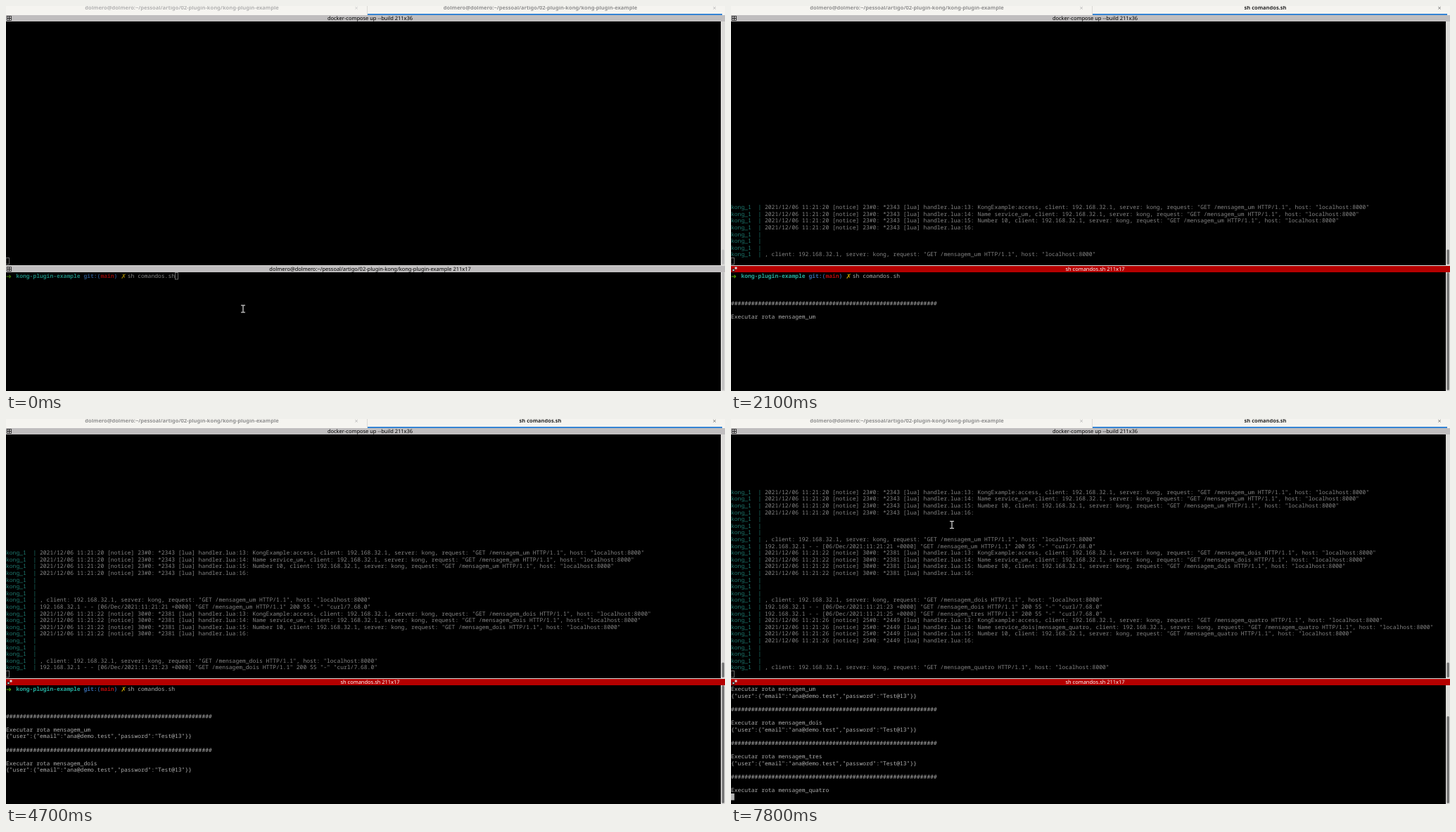
An HTML page with a canvas that plays this animation: 1022x548 px, repeating every 8000 ms.

```html
<!DOCTYPE html>
<html lang="pt">
<head>
<meta charset="utf-8">
<title>Terminal</title>
<style>
html, body { margin: 0; width: 100%; height: 100%; overflow: hidden; background: #000; }
canvas { display: block; }
</style>
</head>
<body>
<canvas id="stage" width="1022" height="548"></canvas>
<script>
const ctx = document.getElementById('stage').getContext('2d');
const LOOP = 8000, COL = 4.8, ROW = 9.6, ROWS = 17;
const LOG_TOP = 22.3, SHELL_TOP = 379.4;
const MONO = '8px "Noto Sans Mono", "DejaVu Sans Mono", monospace';
const SYMBOL = '9.5px "DejaVu Sans", sans-serif';
const SANS = '"Noto Sans", "Open Sans", sans-serif';
const PATH = 'dolmero@dolmero:~/pessoal/artigo/02-plugin-kong/kong-plugin-example';

// Log lines written by the proxy
function notices(route, service, second, pid, id) {
  const head = `2021/12/06 11:21:${second} [notice] ${pid}#0: *${id} [lua] handler.lua:`;
  const tail = `, client: 192.168.32.1, server: kong, request: "GET /mensagem_${route} HTTP/1.1", host: "localhost:8000"`;
  return [
    head + '13: KongExample:access' + tail,
    head + '14: Name ' + service + tail,
    head + '15: Number 10' + tail,
    head + '16:', '', '', '', tail
  ];
}
const access = (route, second) =>
  [`192.168.32.1 - - [06/Dec/2021:11:21:${second} +0000] "GET /mensagem_${route} HTTP/1.1" 200 55 "-" "curl/7.68.0"`];

const logEvents = [
  [1500, notices('um', 'service_um', 20, 23, 2343)],
  [2600, access('um', 21)],
  [3900, notices('dois', 'service_um', 22, 30, 2381)],
  [4700, access('dois', 23)],
  [6800, access('tres', 25)],
  [7800, notices('quatro', 'service_dois|mensagem_quatro', 26, 25, 2449)]
];

// Shell output
const call = route => `\n\n${'#'.repeat(61)}\n\nExecutar rota mensagem_${route}\n`;
const reply = '{"user":{"email":"ana@demo.test","password":"Test@13"}}';
const shellEvents = [
  [0, ' '.repeat(50)],
  [1500, '\n\n' + call('um')], [2600, reply],
  [3600, call('dois')], [4700, reply],
  [5700, call('tres')], [6800, reply],
  [7800, call('quatro')]
];
const prompt = [
  [3, 'kong-plugin-example', '#24a99a'], [23, 'git:(', '#3465a4'],
  [28, 'main', '#b80a0a'], [32, ')', '#3465a4']
];
const symbols = [[0, '➜', '#4e9a06'], [34, '✗', '#c4a000']];

const cursorOn = [[600, 1100], [1400, 2100], [2700, 3300], [3900, 4500], [5100, 5700], [6300, 6900], [7500, 8000]];
const pointerPath = [[0, 337, 431], [600], [5500, 330, 340], [5600, 316, 230], [5700, 309, 170], [6000, 314, 150.5]];

const past = (events, t) => events.filter(e => e[0] <= t);
const mix = (a, b, f) => { const v = Math.round(a + (b - a) * f); return `rgb(${v},${v},${v})`; };

function rect(x, y, w, h, color) {
  ctx.fillStyle = color;
  ctx.fillRect(x, y, w, h);
}
function box(x, y, w, h, color) {
  ctx.strokeStyle = color;
  ctx.lineWidth = 0.8;
  ctx.strokeRect(x, y, w, h);
}
function text(str, x, y, color, font, align = 'left') {
  ctx.font = font;
  ctx.textAlign = align;
  ctx.fillStyle = color;
  ctx.fillText(str, x, y);
}
const cell = (str, col, top, color, weight = '') =>
  text(str, col * COL, top + 7.7, color, weight + MONO);

function tabs(t, focus) {
  rect(0, 0, 1022, 13, '#f5f4f0');
  rect(513, 0, 1, 13, '#dcdad6');
  rect(514, 11, 504, 2, '#3584d4');
  const active = mix(145, 40, focus), idle = mix(178, 145, focus);
  const font = 'bold 7.5px ' + SANS;
  text(PATH, 250, 5.4, idle, font, 'center');
  text(t < 1500 ? PATH : 'sh comandos.sh', 759.5, 5.4, active, font, 'center');
  text('×', 498, 5.6, mix(205, 185, focus), '9px ' + SANS, 'center');
  text('×', 1007, 5.6, mix(185, 120, focus), '9px ' + SANS, 'center');
}

function titleBar(y, label, active) {
  rect(0, y, 1022, 9, active ? '#b40000' : '#c0bebf');
  if (active) {
    rect(1.5, y + 4, 4, 4, '#222');
    rect(2.5, y + 5, 2, 2, '#ddd');
    rect(5.5, y + 1.5, 3, 3, '#ddd');
  } else {
    box(1.5, y + 1.5, 6, 6, '#222');
    rect(4, y + 1.5, 1, 6, '#222');
    rect(1.5, y + 4, 6, 1, '#222');
  }
  text(label, 517.5, y + 7.1, active ? '#fff' : '#000', '7.47px ' + SANS, 'center');
}

function scrollBar(top, bottom, thumb, focus) {
  rect(1016, top, 6, bottom - top, '#dcdbd9');
  ctx.fillStyle = mix(195, 118, focus);
  ctx.beginPath();
  ctx.roundRect(1017.5, thumb, 3.5, bottom - 1 - thumb, 1.75);
  ctx.fill();
}

function logPane(t, focus) {
  const lines = past(logEvents, t).flatMap(e => e[1]);
  lines.forEach((line, i) => {
    const top = LOG_TOP + (35 - lines.length + i) * ROW;
    cell('kong_1  |', 0, top, '#1d7a70');
    cell(line, 10, top, '#848484');
  });
  box(0, 358.4, 4.5, 9.4, '#848484');
  scrollBar(22, 369, 346.5, focus);
}

function shellPane(t, focus) {
  const lines = past(shellEvents, t).map(e => e[1]).join('').split('\n');
  const scroll = Math.max(0, lines.length - ROWS);
  const gray = mix(132, 172, focus);
  if (!scroll) {
    ctx.globalAlpha = 0.77 + 0.23 * focus;
    for (const [col, str, color] of prompt) cell(str, col, SHELL_TOP, color, 'bold ');
    for (const [col, str, color] of symbols) text(str, col * COL, SHELL_TOP + 8.2, color, SYMBOL);
    ctx.globalAlpha = 1;
    cell('sh comandos.sh', 36, SHELL_TOP, gray);
  }
  lines.slice(scroll).forEach((line, i) => cell(line, 0, SHELL_TOP + i * ROW, gray));

  const x = lines.at(-1).length * COL, y = SHELL_TOP + (lines.length - 1 - scroll) * ROW;
  if (t < 600) box(x + 0.4, y + 0.2, 4.2, 9.4, gray);
  else if (cursorOn.some(([from, to]) => t >= from && t < to)) rect(x, y, COL, ROW, '#b4b4b4');

  const height = 548 - 379;
  scrollBar(379, 548, 548 - height * ROWS / (ROWS + scroll), focus);
}

function pointer(t) {
  const [, x, y] = past(pointerPath, t).at(-1);
  if (x === undefined) return;
  rect(x - 0.6, y - 5, 1.2, 10, '#ddd');
  rect(x - 3, y - 5.5, 6, 1.1, '#ddd');
  rect(x - 3, y + 4.5, 6, 1.1, '#ddd');
}

function draw(now) {
  const t = now % LOOP;
  // The window gains focus in three steps
  const focus = Math.min(3, Math.max(0, Math.floor((t - 500) / 100))) / 3;
  ctx.textRendering = 'geometricPrecision';
  rect(0, 0, 1022, 548, '#000');
  tabs(t, focus);
  titleBar(13, 'docker-compose up --build 211x36', false);
  logPane(t, focus);
  rect(0, 369, 1022, 1, '#dcdbd9');
  titleBar(370, (t < 1500 ? PATH : 'sh comandos.sh') + ' 211x17', t >= 600);
  shellPane(t, focus);
  pointer(t);
}

const start = performance.now();
function tick() {
  draw(performance.now() - start);
  requestAnimationFrame(tick);
}
tick();
</script>
</body>
</html>
```
